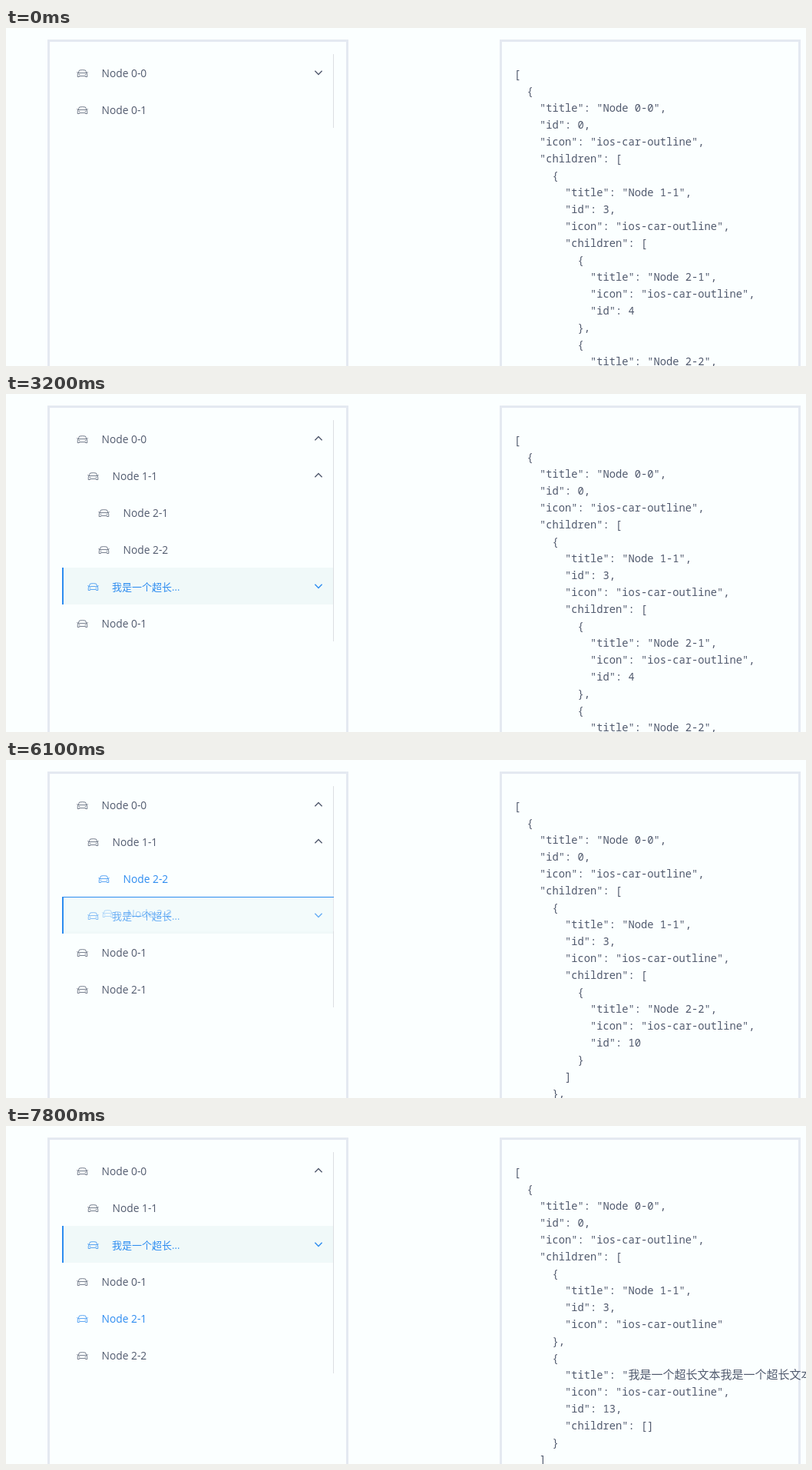
Animation of 1042 by 440 pixels, one loop 8 s. Source, as an HTML page with a canvas:

```html
<!DOCTYPE html>
<html lang="en">
<head>
<meta charset="utf-8">
<title>Draggable tree menu</title>
<style>
  html, body { margin: 0; width: 100%; height: 100%; overflow: hidden; background: #fbffff; }
  canvas { display: block; }
</style>
</head>
<body>
<canvas id="stage" width="1042" height="440"></canvas>
<script>
const ctx = document.getElementById('stage').getContext('2d');
const LOOP = 8000, STEP = 100;
const BG = '#fbffff', FRAME = '#e4e9f1', RULE = '#dcdee2';
const GREY = [81, 90, 110], BLUE = [45, 140, 240];
const LEFT = 73, RIGHT = 427, TOP = 34, ROW = 48;
const UI = '"Open Sans", "Noto Sans CJK SC", "Noto Sans CJK", sans-serif';
const MONO = '"Noto Sans Mono", "DejaVu Sans Mono", monospace';
const LONG = '我是一个超长文本'.repeat(4);

// Tree data
const icon = 'ios-car-outline';
const leaf = (title, id) => ({ title, icon, id });
const n21 = leaf('Node 2-1', 4), n22 = leaf('Node 2-2', 10);
const long = { ...leaf(LONG, 13), children: [] };
const last = { title: 'Node 0-1', id: 1, icon };

function makeTree(kids, moved) {
  const inner = { title: 'Node 1-1', id: 3, icon };
  if (kids.length) inner.children = kids;
  return [{ title: 'Node 0-0', id: 0, icon, children: [inner, long] }, last, ...moved];
}
const trees = [
  { from: 0, nodes: makeTree([n21, n22], []) },
  { from: 50, nodes: makeTree([n22], [n21]) },
  { from: 70, nodes: makeTree([], [n21, n22]) }
];
for (const t of trees) t.lines = JSON.stringify(t.nodes, null, 2).split('\n').slice(0, 18);

// Timeline, in steps of 100 ms: [node id, start, end]
const hovers = [
  [0, 6, 13], [3, 13, 20], [4, 20, 21], [10, 21, 22], [13, 22, 31],
  [1, 26, 30], [10, 33, 34], [4, 34, 54], [10, 50, 54], [10, 57, 70],
  [1, 74, 76], [4, 77, 99]
];
const selections = [[0, 9, 17], [3, 17, 24], [13, 24, 99]];
const opens = [[0, 9, 99], [3, 17, 99], [13, 24, 30]];
const drags = [
  { node: n21, end: 50, path: [[37, 0, 0], [40, -8, 63], [44, -20, 152], [46, -21, 160], [48, -23, 169]] },
  { node: n22, end: 70, path: [[61, 5, 45], [64, -4, 135], [66, -11, 163], [68, -13, 165]] }
];

const clamp = v => Math.max(0, Math.min(1, v));
const ramp = (s, at, n) => clamp((s - at + 1) / n);
const easeOut = p => 1 - (1 - p) ** 2;
const mix = k => `rgb(${GREY.map((g, i) => Math.round(g + (BLUE[i] - g) * k))})`;

function level(list, id, s, n = 2, ease = p => p) {
  return list.reduce((best, [key, on, off]) => key === id
    ? Math.max(best, ease(ramp(s, on, n)) - ease(ramp(s, off, n))) : best, 0);
}
const tint = (id, s) => Math.max(level(hovers, id, s), level(selections, id, s));

function follow(path, s) {
  for (let i = 1; i < path.length; i++) {
    const [a, ax, ay] = path[i - 1], [b, bx, by] = path[i];
    if (s <= b) {
      const k = (s - a) / (b - a);
      return [ax + (bx - ax) * k, ay + (by - ay) * k];
    }
  }
  return path[path.length - 1].slice(1);
}

function box(x, y, w, h, color) {
  ctx.fillStyle = color;
  ctx.fillRect(x, y, w, h);
}

function car(x, y, color) {
  ctx.save();
  ctx.translate(x, y);
  ctx.strokeStyle = color;
  ctx.lineWidth = 0.9;
  ctx.globalAlpha *= 0.85;
  ctx.beginPath();
  ctx.moveTo(2, 4.5);
  ctx.lineTo(3.6, 1);
  ctx.quadraticCurveTo(7.5, 0.2, 11.4, 1);
  ctx.lineTo(13, 4.5);
  ctx.moveTo(0.3, 3.5);
  ctx.lineTo(2, 4.5);
  ctx.lineTo(13, 4.5);
  ctx.lineTo(14.7, 3.5);
  ctx.moveTo(2, 4.5);
  ctx.quadraticCurveTo(1, 5.5, 1.2, 9.5);
  ctx.lineTo(3.4, 9.5);
  ctx.lineTo(3.4, 8.5);
  ctx.lineTo(11.6, 8.5);
  ctx.lineTo(11.6, 9.5);
  ctx.lineTo(13.8, 9.5);
  ctx.quadraticCurveTo(14, 5.5, 13, 4.5);
  ctx.moveTo(2.6, 6.5);
  ctx.lineTo(4.4, 6.5);
  ctx.moveTo(10.6, 6.5);
  ctx.lineTo(12.4, 6.5);
  ctx.stroke();
  ctx.restore();
}

function chevron(y, turn, color) {
  ctx.save();
  ctx.translate(407, y);
  ctx.rotate(Math.PI * turn);
  ctx.strokeStyle = color;
  ctx.lineWidth = 1.4;
  ctx.beginPath();
  ctx.moveTo(-4.6, -2.2);
  ctx.lineTo(0, 2.4);
  ctx.lineTo(4.6, -2.2);
  ctx.stroke();
  ctx.restore();
}

function label(node, depth, y, color) {
  const x = 92 + 14 * depth, isLong = node === long;
  car(x, y + 20, color);
  ctx.fillStyle = color;
  ctx.font = `${isLong ? 13 : 13.8}px ${UI}`;
  ctx.fillText(isLong ? LONG.slice(0, 6) + '...' : node.title, x + (isLong ? 32 : 32.5), y + 30);
}

function drawRow(node, depth, y, s) {
  const color = mix(tint(node.id, s)), chosen = level(selections, node.id, s);
  if (chosen) {
    ctx.globalAlpha = chosen;
    box(LEFT, y, RIGHT - LEFT, ROW, s > 61 && s < 70 ? '#f0f8fd' : '#f0f9f9');
    box(LEFT, y, 2, ROW, mix(1));
    ctx.globalAlpha = 1;
  }
  label(node, depth, y, color);
  if (node.children) chevron(y + 24, level(opens, node.id, s, 3, easeOut), color);
}

// Draws a list of nodes and returns its height; fills `rows` with visible rows.
function drawNodes(nodes, depth, top, s, rows) {
  let y = top;
  for (const node of nodes) {
    drawRow(node, depth, y, s);
    rows.push({ node, y });
    y += ROW;
    const open = level(opens, node.id, s, 3, easeOut);
    if (open && node.children && node.children.length) {
      ctx.save();
      ctx.beginPath();
      const full = heightOf(node.children, s);
      ctx.rect(LEFT, y, RIGHT - LEFT, full * open);
      ctx.clip();
      drawNodes(node.children, depth + 1, y, s, rows);
      ctx.restore();
      y += Math.round(full * open);
    }
  }
  return y - top;
}

function heightOf(nodes, s) {
  return nodes.reduce((h, n) => h + ROW +
    (n.children ? heightOf(n.children, s) * level(opens, n.id, s, 3, easeOut) : 0), 0);
}

function drawDrag(drag, rows, s) {
  const [dx, dy] = follow(drag.path, s);
  const pointer = 145 + dy;
  const target = rows.find(r => pointer >= r.y && pointer < r.y + ROW);
  ctx.save();
  ctx.beginPath();
  ctx.rect(LEFT, TOP, RIGHT - LEFT, 288);
  ctx.clip();
  ctx.globalAlpha = 0.28;
  box(LEFT + dx, 130 + dy, RIGHT - LEFT, ROW, BG);
  ctx.restore();
  ctx.save();
  ctx.globalAlpha = 0.4;
  ctx.translate(dx, dy);
  label(drag.node, 2, 130, mix(1));
  ctx.restore();
  if (target && target.node !== drag.node) {
    const low = pointer >= target.y + ROW / 2;
    box(LEFT, target.y + (low ? ROW - 1 : 0), RIGHT - LEFT, 1, mix(tint(target.node.id, s)));
  }
}

function drawCode(lines) {
  ctx.fillStyle = mix(0);
  lines.forEach((line, i) => {
    let x = 662;
    for (const part of line.split(/([^\x00-\x7f]+)/)) {
      const wide = part.charCodeAt(0) > 127;
      ctx.font = wide ? `15px "Noto Sans CJK SC", "Noto Sans CJK", sans-serif` : `13.75px ${MONO}`;
      ctx.fillText(part, x, 65 + 22 * i);
      x += ctx.measureText(part).width;
    }
  });
}

function panel(x) {
  ctx.strokeStyle = FRAME;
  ctx.lineWidth = 3;
  ctx.strokeRect(x + 1.5, 16.5, 389, 500);
}

function draw(now) {
  const s = Math.floor((now % LOOP) / STEP);
  const tree = trees.filter(t => s >= t.from).pop();
  box(0, 0, 1042, 440, BG);
  panel(54);
  panel(643);
  const rows = [];
  const height = drawNodes(tree.nodes, 0, TOP, s, rows);
  box(RIGHT - 1, TOP, 1, height, RULE);
  const drag = drags.find(d => s >= d.path[0][0] && s < d.end);
  if (drag) drawDrag(drag, rows, s);
  drawCode(tree.lines);
}

const start = performance.now();
function loop() {
  draw(performance.now() - start);
  requestAnimationFrame(loop);
}
loop();
</script>
</body>
</html>
```
